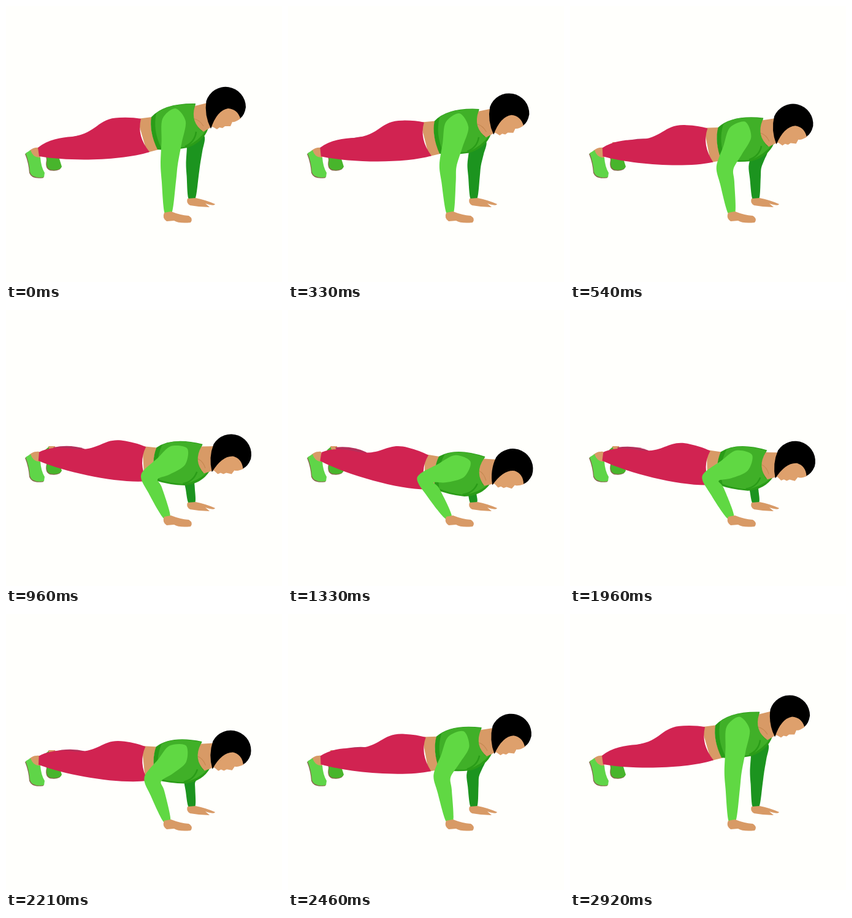
Write an HTML page that moves like this. It is 450 by 450 pixels and loops after 2.96 s.

```html
<!DOCTYPE html>
<html lang="en">
<head>
<meta charset="utf-8">
<title>Push-up</title>
<style>
  html, body { margin: 0; width: 100%; height: 100%; overflow: hidden; background: #fffffc; }
  svg { display: block; width: 100vw; height: 100vh; }
</style>
</head>
<body>
<svg id="stage" viewBox="0 0 450 450"></svg>
<script>
const LOOP = 2960;
const LOWER = { start: 20, length: 1430 };
const RISE = { start: 1620, length: 1370 };
const PIVOT = [50, 240];
const MAX_TILT = 17.2;
const COLOR = {
  skin: '#d89a66', face: '#dea06c', crease: '#c3854f', pants: '#d12351', farPants: '#b42f5a',
  top: '#40b028', topShade: '#2a9c18', sleeve: '#60d843', farSleeve: '#1c941f',
  shoe: '#5fd548', farShoe: '#48b52c', sole: '#86694c', hair: '#000'
};

const stage = document.getElementById('stage');

function path(fill, d = '', parent = stage) {
  const node = document.createElementNS('http://www.w3.org/2000/svg', 'path');
  node.setAttribute('fill', fill);
  node.setAttribute('d', d);
  return parent.appendChild(node);
}

function line(stroke, width, d, parent) {
  const node = path('none', d, parent);
  node.setAttribute('stroke', stroke);
  node.setAttribute('stroke-width', width);
}

function shoe(fill, d) {
  path(COLOR.sole, d).setAttribute('transform', 'translate(-1 1.2)');
  path(fill, d);
}

// Far side
const farArm = path(COLOR.farSleeve);
path(COLOR.skin, 'M296,314L309,313Q325,316 341,323Q340,327 325,322L332,328Q316,328 300,325Q293,321 296,314Z');
shoe(COLOR.farShoe, 'M64,228L71,222Q76,245 86,246L91,262Q88,269 73,267Q64,264 67,250Z');
path(COLOR.skin, 'M69,222H80L82,238L74,237Z');
const farLeg = path(COLOR.farPants);

// Near foot
path(COLOR.skin, 'M38,236Q45,230 54,231L56,247L46,248Z');
shoe(COLOR.shoe, 'M32,240L40,235Q44,248 56,247Q57,262 63,272L62,279Q43,282 39,271Q38,255 32,240Z');

// Torso, legs and head turn as one piece about the feet
const body = stage.appendChild(document.createElementNS('http://www.w3.org/2000/svg', 'g'));
path(COLOR.skin, 'M214,184L238,181Q232,206 249,234L230,239Z', body);
path(COLOR.topShade, 'M237,181Q258,158 309,159Q303,190 319,202L330,199Q322,222 296,231Q270,236 247,234Q233,205 237,181Z', body);
path(COLOR.top, 'M245,175Q264,159 308,160Q303,190 319,204L326,203Q314,220 294,229Q272,233 253,231Q239,203 245,175Z', body);
line(COLOR.topShade, 2.5, 'M292,229Q308,222 310,205', body);
path(COLOR.skin, 'M308,163L332,157L337,196L322,205Q300,190 308,163Z', body);
line(COLOR.crease, 1, 'M307,184Q316,186 322,196', body);
path(COLOR.pants, 'M52,231C68,218 90,214 108,213C150,207 148,183 185,182Q205,181 220,184Q213,212 234,238C190,252 105,254 54,245Z', body);
path(COLOR.face, 'M334,198L345,165H375L383,183Q374,190 369,189L366,196L357,196L353,199L348,198L344,201L337,197Z', body);
path(COLOR.hair, 'M334,200Q323,178 326.5,155A33,33 0 0 1 391,165Q389,178 382,183Q377,168 362,167Q344,170 334,200Z', body);

// Near arm
const nearArm = path(COLOR.sleeve);
path(COLOR.skin, 'M258,337L269,335Q284,341 298,342Q306,347 301,353Q282,355 274,350L262,351Q254,346 258,337Z');

function rotate([x, y], degrees) {
  const a = degrees * Math.PI / 180, dx = x - PIVOT[0], dy = y - PIVOT[1];
  return [PIVOT[0] + dx * Math.cos(a) - dy * Math.sin(a),
          PIVOT[1] + dx * Math.sin(a) + dy * Math.cos(a)];
}

const mix = (a, b, t) => a.map((v, k) => v + (b[k] - v) * t);

function direction(a, b) {
  const length = Math.hypot(b[0] - a[0], b[1] - a[1]);
  return [(b[0] - a[0]) / length, (b[1] - a[1]) / length];
}

// Smooth closed curve through the points.
function outline(points, bend = 0.15) {
  const n = points.length;
  const at = i => points[(i + n) % n];
  const handle = (i, sign) => at(i).map((v, k) => v + sign * bend * (at(i + 1)[k] - at(i - 1)[k]));
  const curves = points.map((p, i) => 'C' + [handle(i, 1), handle(i + 1, -1), at(i + 1)].join(' '));
  return 'M' + points[0] + curves.join('') + 'Z';
}

// Tapered sleeve with a rounded shoulder; each joint has a half-width.
function sleeve(shoulder, elbow, wrist, [wide, middle, narrow]) {
  const upper = direction(shoulder, elbow), lower = direction(elbow, wrist);
  const bend = direction([0, 0], [upper[0] + lower[0], upper[1] + lower[1]]);
  const ribs = [
    [shoulder, upper, wide],
    [mix(shoulder, elbow, .5), upper, (wide + middle) / 2],
    [elbow, bend, middle],
    [mix(elbow, wrist, .34), lower, middle * .75 + narrow * .2],
    [wrist, lower, narrow]
  ];
  const side = sign => ribs.map(([[x, y], [tx, ty], r]) => [x - sign * ty * r, y + sign * tx * r]);
  const tip = [shoulder[0] - upper[0] * wide, shoulder[1] - upper[1] * wide];
  return outline([tip, ...side(1), ...side(-1).reverse()]);
}

function ease(time, { start, length }) {
  const u = Math.min(1, Math.max(0, (time - start) / length));
  return (1 - Math.cos(Math.PI * u)) / 2;
}

function draw(time) {
  const d = 1.015 * (ease(time, LOWER) - ease(time, RISE));
  const tilt = MAX_TILT * d;
  body.setAttribute('transform', `rotate(${tilt} ${PIVOT})`);

  nearArm.setAttribute('d', sleeve(
    rotate([274, 186], tilt),
    [266 - 46 * d + 4 * d * d, 258 + 19 * d],
    [264.5 - 3 * d, 337],
    [19, 14, 6]));

  const [farX, farY] = rotate([310, 212], tilt);
  farArm.setAttribute('d', sleeve(
    [farX - 4 * d, farY - 10 * d],
    [305 - 14 * d + 8 * d * d, 258 + 10 * d + 24 * d * d],
    [303, 314],
    [14 - 5 * d, 11.5 - 4 * d, 5.5]));

  farLeg.setAttribute('d',
    `M77,224Q105,${212 + 9 * d} 128,${210 + 22 * d}L128,240L84,238Z`);
}

function tick(now) {
  draw(now % LOOP);
  requestAnimationFrame(tick);
}
draw(0);
requestAnimationFrame(tick);
</script>
</body>
</html>
```
